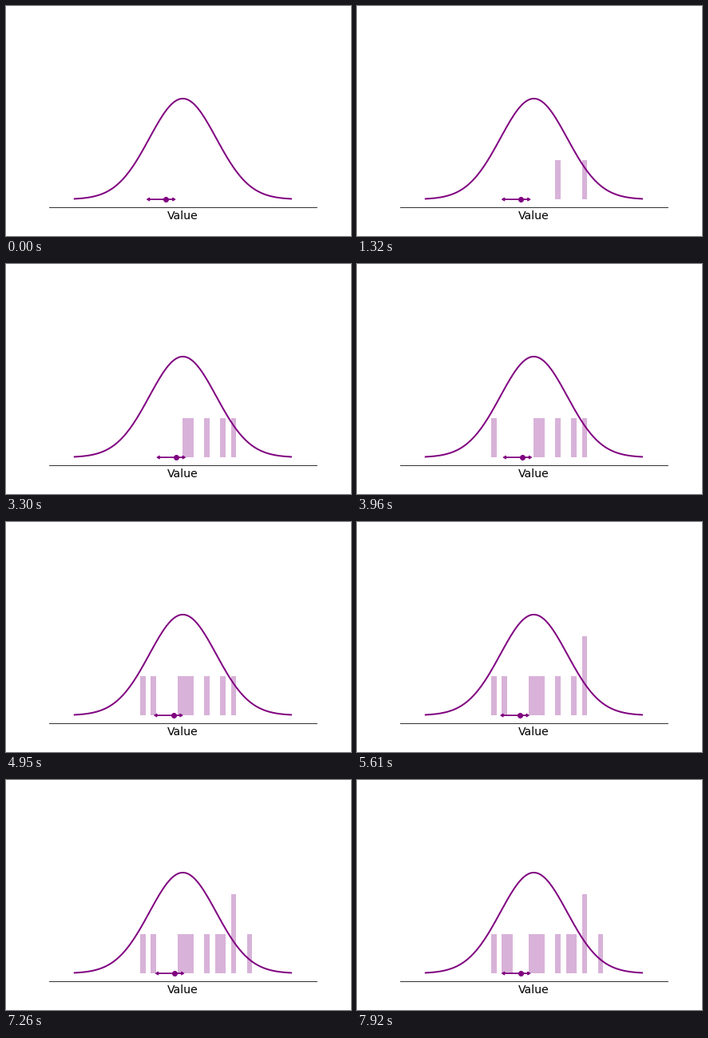
A matplotlib script that plays this animation: 432 px wide and 288 px high, repeating every 8 s.

```python
import matplotlib.pyplot as plt
import numpy as np
from matplotlib.animation import FuncAnimation
from matplotlib.patches import FancyArrow

COLOR = "purple"
LOOP, TICK, HOLD = 8000, 20, 330      # milliseconds
TAU, RATE, START = 0.3, 0.2, -0.5     # online quantile estimate
BIN = 8 / 50
BAR_HEIGHT = 0.25
SAMPLE_BINS = [29, 34, 32, 25, 26, 17, 24, 19, 34, 37, 31, 20]

# Each sample pulls the estimate up by TAU or down by 1 - TAU.
estimates = [START]
for b in SAMPLE_BINS:
    value = -4 + (b + 0.5) * BIN
    step = TAU if value > estimates[-1] else TAU - 1
    estimates.append(estimates[-1] + RATE * step)

fig = plt.figure(figsize=(6, 4), dpi=72, facecolor="white")
fig.subplots_adjust(left=0.125, right=0.9, bottom=0.125, top=0.88)
ax = fig.add_subplot()
ax.set(xlim=(-4, 4), ylim=(-0.05, 1.05), xticks=[], yticks=[])
ax.spines[["left", "right", "top"]].set_visible(False)
ax.set_xlabel("Value", fontsize=14, family="DejaVu Sans")

x = np.linspace(-3.24, 3.24, 200)
ax.plot(x, 1.6 * np.exp(-x**2 / 2) / np.sqrt(2 * np.pi), color=COLOR, lw=2)

bars = []
for i, b in enumerate(SAMPLE_BINS):
    level = SAMPLE_BINS[:i].count(b) * BAR_HEIGHT
    bars += ax.bar(-4 + b * BIN, BAR_HEIGHT, BIN, bottom=level, align="edge",
                   color=COLOR, alpha=0.3, linewidth=0)
ax.set(xlim=(-4, 4), ylim=(-0.05, 1.05))

dot, = ax.plot([START], [0], "o", color=COLOR, ms=6, mew=1)
arrows = []
for dx in (-0.575, 0.275):
    arrow = FancyArrow(START, 0, dx, 0, width=0.001, head_width=0.02,
                       head_length=0.08, length_includes_head=True,
                       color=COLOR, lw=1)
    arrows.append(ax.add_patch(arrow))


def update(i):
    beat = (i * TICK + TICK // 2) // HOLD
    shown = (beat + 1) // 2
    for n, bar in enumerate(bars):
        bar.set_visible(n < shown)
    pos = estimates[beat // 2]
    dot.set_xdata([pos])
    for arrow in arrows:
        arrow.set_data(x=pos)
    return [*bars, dot, *arrows]


anim = FuncAnimation(fig, update, frames=LOOP // TICK, interval=TICK,
                     repeat=True, repeat_delay=0)
plt.show()
```
